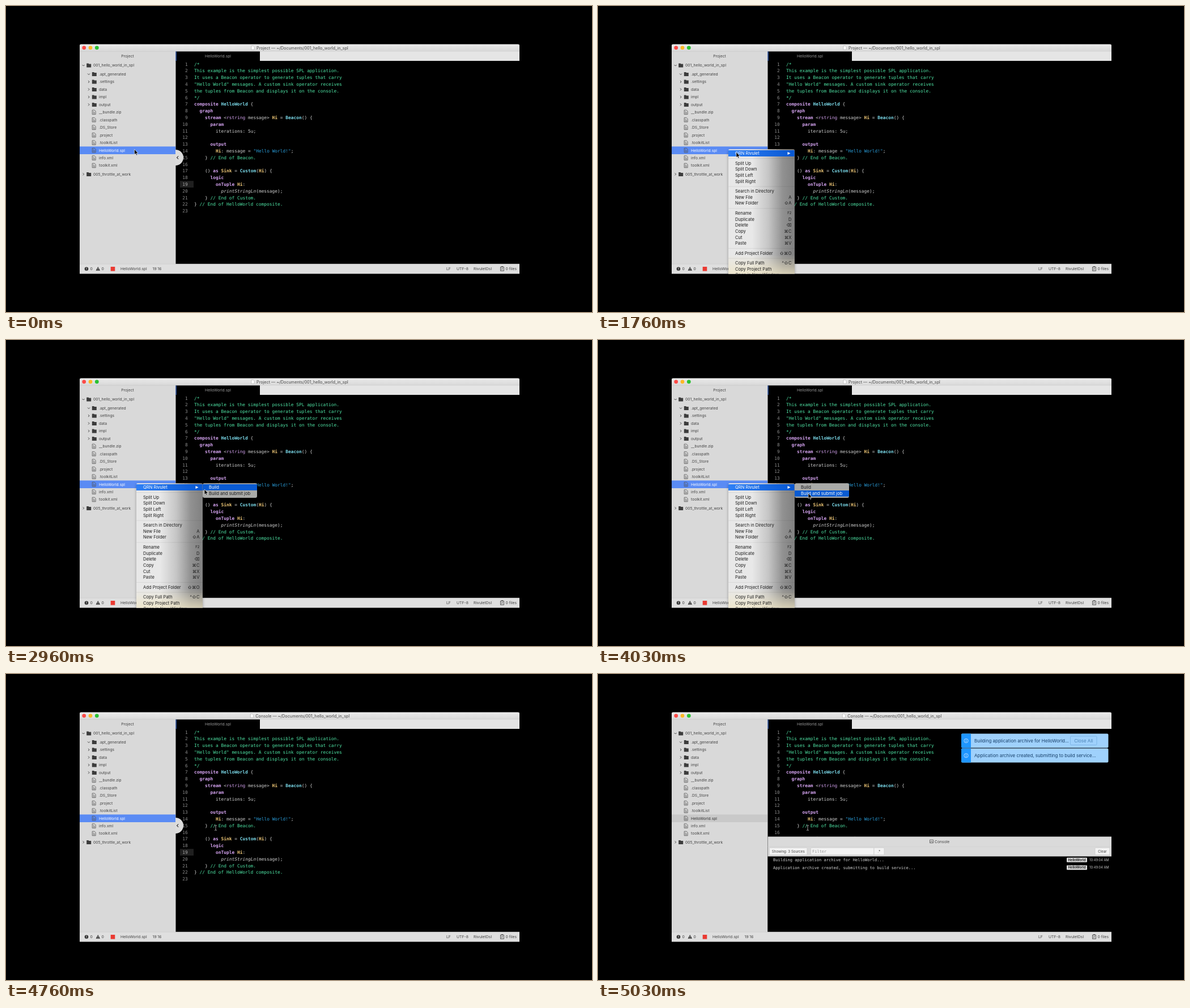
Recreate the animation shown at these times as an HTML page. Size 1034 px wide and 541 px high, loop 8000 ms.

```html
<!DOCTYPE html>
<html lang="en">
<head>
<meta charset="utf-8">
<title>Editor build demo</title>
<style>
html, body { margin: 0; width: 100%; height: 100%; overflow: hidden; background: #000; }
svg { display: block; }
text { font-family: Inter, "DejaVu Sans", sans-serif; white-space: pre; }
.mono { font-family: "DejaVu Sans Mono", monospace; }
</style>
</head>
<body>
<svg id="stage" width="1034" height="541" viewBox="0 0 1034 541"></svg>
<script>
const LOOP = 8000;
const esc = s => s.replace(/&/g, '&amp;').replace(/</g, '&lt;');
const rect = (x, y, w, h, fill, extra = '') =>
  `<rect x="${x}" y="${y}" width="${w}" height="${h}" fill="${fill}" ${extra}/>`;
const path = (d, stroke, width = 1, fill = 'none', extra = '') =>
  `<path d="${d}" fill="${fill}" stroke="${stroke}" stroke-width="${width}" ${extra}/>`;
const circle = (x, y, r, fill, extra = '') =>
  `<circle cx="${x}" cy="${y}" r="${r}" fill="${fill}" ${extra}/>`;
// y is the vertical centre of the capitals
const text = (x, y, s, size, fill = '#444', extra = '') =>
  `<text x="${x}" y="${y + size * 0.36}" font-size="${size}" fill="${fill}" ${extra}>${esc(s)}</text>`;
const group = (id, body, extra = '') => `<g id="${id}" ${extra}>${body}</g>`;
const END = 'text-anchor="end"', MID = 'text-anchor="middle"';

const defs = `<defs>
  <linearGradient id="titleBar" x2="0" y2="1"><stop stop-color="#ebebeb"/><stop offset="1" stop-color="#d8d8d8"/></linearGradient>
  <linearGradient id="menuFill"><stop offset=".36" stop-color="#e8e8e8"/><stop offset=".6" stop-color="#c6c6c6"/>
    <stop offset=".82" stop-color="#919191"/><stop offset="1" stop-color="#808080"/></linearGradient>
  <linearGradient id="menuWarm" x2="0" y2="1"><stop stop-color="#f0e6c4" stop-opacity="0"/><stop offset="1" stop-color="#f0e6c4" stop-opacity=".75"/></linearGradient>
  <linearGradient id="menuBlue"><stop stop-color="#2f80f6"/><stop offset="1" stop-color="#0757d2"/></linearGradient>
  <clipPath id="windowClip"><path d="M130 473.5V70.5a3 3 0 0 1 3-3H903a3 3 0 0 1 3 3V473.5Z"/></clipPath>
  <filter id="shadow" x="-10%" y="-10%" width="120%" height="120%"><feDropShadow dx="0" dy="2" stdDeviation="2.5" flood-opacity=".3"/></filter>
</defs>`;

function chrome() {
  const lights = ['#fc4a47', '#fdb825', '#2ac232'].map((c, i) => circle(137.7 + i * 11.3, 73.8, 3.4, c)).join('');
  const title = (id, x, word) => group(id,
    path(`M${x - 9} 70.6h3.4l1.6 1.6v5h-5Z`, '#aaa', 0.6, '#fff') +
    text(x, 74, word + ' — ~/Documents/001_hello_world_in_spl', 7.25, '#484848'));
  return rect(130, 67.5, 776, 406, '#d9d9d9') + rect(130, 67.5, 776, 12.7, 'url(#titleBar)') +
    rect(130, 79.8, 776, 0.6, '#c2c2c2') + lights +
    title('titleProject', 442, 'Project') + title('titleConsole', 440.3, 'Console') +
    rect(448, 80.4, 458, 16.6, '#e5e5e5') + rect(299.5, 80.4, 148.5, 17, '#000') +
    rect(299.5, 80.4, 1.2, 16.6, '#3d6fd2') + text(374, 88.6, 'HelloWorld.spl', 6.75, '#999', MID) +
    text(214.5, 88.6, 'Project', 6.8, '#444', MID);
}

const chevron = (x, y, open) =>
  path(open ? `M${x - 2} ${y - 1}l2 2l2 -2` : `M${x - 1} ${y - 2}l2 2l-2 2`, '#444', 1);
const folder = (x, y) => path(`M${x - 4} ${y - 3.4}h3.4l.8 1h3.8v6h-8Z`, 'none', 0, '#3c3c3c');
const file = (x, y) =>
  path(`M${x - 3} ${y - 3.8}h4l2 2v5.6h-6Z`, '#555', 0.8) +
  path(`M${x - 1.7} ${y - 1.2}h1.8M${x - 1.7} ${y + .6}h3.4M${x - 1.7} ${y + 2.2}h3.4`, '#555', 0.7);

function tree() {
  const names = ['.apt_generated', '.settings', 'data', 'impl', 'output', '__bundle.zip', '.classpath',
    '.DS_Store', '.project', '.toolkitList', 'HelloWorld.spl', 'info.xml', 'toolkit.xml'];
  let out = rect(130, 248.4, 169.2, 13.6, '#5a8bf4', 'id="selection"');
  for (const [y, name, open] of [[105, '001_hello_world_in_spl', true], [297.3, '005_throttle_at_work', false]])
    out += chevron(136.6, y, open) + folder(146.2, y) + text(154, y, name, 6.75);
  names.forEach((name, i) => {
    const y = 120.5 + i * 13.46;
    out += i < 5 ? chevron(146, y, !i) + folder(155.8, y) : file(155.2, y);
    out += text(164, y, name, 6.75, '#444', i === 10 ? 'id="selectedName"' : '');
  });
  return out;
}

const code = `/*
This example is the simplest possible SPL application.
It uses a Beacon operator to generate tuples that carry
"Hello World" messages. A custom sink operator receives
the tuples from Beacon and displays it on the console.
*/
composite HelloWorld {
  graph
    stream <rstring message> Hi = Beacon() {
      param
        iterations: 5u;

      output
        Hi: message = "Hello World!";
    } // End of Beacon.

    () as Sink = Custom(Hi) {
      logic
        onTuple Hi:
          printStringLn(message);
    } // End of Custom.
} // End of HelloWorld composite.
`.split('\n');

const styles = [
  [/^\/\//, 'fill="#4fe6a6"'],
  [/^"/, 'fill="#2b9fdc"'],
  [/^(composite|graph|stream|param|output|as|logic|onTuple)$/, 'fill="#d6a4f2" font-weight="bold"'],
  [/^rstring$/, 'fill="#d6a4f2"'],
  [/^(HelloWorld|Beacon|Custom)$/, 'fill="#7cdcec" font-weight="bold"'],
  [/^(Hi|Sink)$/, 'fill="#f0c877" font-weight="bold"'],
  [/^printStringLn$/, 'font-style="italic"'],
];
function highlight(line, i) {
  if (i < 6) return `<tspan fill="#4fe6a6">${esc(line)}</tspan>`;
  return (line.match(/\/\/.*|".*?"|\w+|\W/g) || []).map(token => {
    const style = styles.find(([rule]) => rule.test(token));
    return `<tspan ${style ? style[1] : ''}>${esc(token)}</tspan>`;
  }).join('');
}

function editor() {
  let out = rect(299.5, 97, 606.5, 359, '#000') + rect(307, 309.2, 24, 11.8, '#202020');
  code.forEach((line, i) => {
    const y = 105.5 + i * 11.8;
    out += `<text class="mono" font-size="7.88" y="${y}" x="320.7" fill="${i === 18 ? '#aaa' : '#8c8c8c'}" ${END}>${i + 1}</text>` +
      `<text class="mono" font-size="7.88" y="${y}" x="332" fill="#cfcfcf">${highlight(line, i)}</text>`;
  });
  return out + group('handle', path('M299 254a14 14 0 0 1 0 28Z', 'none', 0, '#dcdcdc') +
    path('M304.2 265.3l-2.7 2.7l2.7 2.7', '#333', 1.1));
}

function consolePanel() {
  const button = (x, w, label) => rect(x, 307.2, w, 12.6, '#f3f3f3', 'stroke="#c4c4c4" stroke-width=".6" rx="1"') +
    text(x + w / 2, 313.5, label, 6.15, '#444', MID);
  const row = (y, s) => text(309, y, s, 7.08, '#d2d2d2', 'class="mono"') +
    rect(827, y - 4, 36, 8, '#dcdcdc', 'rx="1"') + text(845, y, 'HelloWorld', 5.8, '#222', MID + ' font-weight="bold"') +
    text(901.5, y, '10:49:04 AM', 5.7, '#c4c4c4', END);
  return rect(299.5, 287.5, 606.5, 168.5, '#000') + rect(299.5, 287.5, 606.5, 35, '#dadada') +
    rect(299.5, 304.8, 606.5, 0.5, '#cbcbcb') +
    path('M585.5 293.2h6v5.6h-6ZM585.5 297h2l1-1.5l1 1.5h2', '#555', 0.8) + text(594, 296.3, 'Console', 6.8) +
    button(302.5, 66.5, 'Showing: 3 Sources') + button(375.5, 111.5, '') + button(487, 18, '.*') + button(877, 26, 'Clear') +
    text(378, 313.5, 'Filter', 7, '#999', 'class="mono"') +
    row(328.8, 'Building application archive for HelloWorld...') +
    row(342.2, 'Application archive created, submitting to build service...');
}

const notice = (id, y, s) => group(id,
  rect(641, y, 259.5, 25, '#9fd1fc', 'rx="2"') + path(`M658 ${y}h-15a2 2 0 0 0 -2 2v21a2 2 0 0 0 2 2h15Z`, 'none', 0, '#1f96ff') +
  circle(649.5, y + 12.6, 3.6, 'none', 'stroke="#c4e3ff" stroke-width=".9"') +
  path(`M649.5 ${y + 10.3}v1.1M649.5 ${y + 12.2}v2.6`, '#c4e3ff', 1) +
  text(664, y + 12.7, s, 8, '#173f68'));

function notices() {
  return notice('notice1', 105.4, 'Building application archive for HelloWorld...') +
    notice('notice2', 131.6, 'Application archive created, submitting to build service...') +
    group('closeAll', rect(833.5, 110, 46.5, 15.5, '#9fd1fc', 'stroke="#78b2e2" stroke-width=".8" rx="1.5"') +
      text(856.7, 117.8, 'Close All', 8, '#4b83b5', MID));
}

function statusBar() {
  const y = 464.7;
  return rect(130, 456, 776, 17.5, '#dfdfdf') + rect(130, 455.8, 776, 0.6, '#c6c6c6') +
    circle(142, y, 3.3, '#333') + path(`M142 ${y - 2}v2.4M142 ${y + 1}v1`, '#eee', 0.9) +
    path('M162.3 461l3.7 6.8h-7.4Z', 'none', 0, '#333') + path('M162.3 463.2v2.3M162.3 466v1', '#eee', 0.8) +
    rect(184.7, 461, 7.6, 7.6, '#ea3a32') +
    [[148.5, '0'], [168.5, '0'], [202, 'HelloWorld.spl'], [258.5, '19:16'], [777, 'LF'], [795, 'UTF-8'],
      [825, 'RivuletDsl'], [881.5, '0 files']].map(([x, s]) => text(x, y, s, 6.85)).join('') +
    path('M872.5 461.4h6v6.8h-6ZM874 460.7h3M874 464h3M874 466h2', '#444', 0.9);
}

function menu() {
  const items = [
    [260.4, 'QRN Rivulet', ''],
    [278, 'Split Up', ''], [288.6, 'Split Down', ''], [299.3, 'Split Left', ''], [310, 'Split Right', ''],
    [327.4, 'Search in Directory', ''], [338, 'New File', 'A'], [348.7, 'New Folder', '⇧A'],
    [366.2, 'Rename', 'F2'], [376.9, 'Duplicate', 'D'], [387.5, 'Delete', '⌫'], [398.2, 'Copy', '⌘C'],
    [408.8, 'Cut', '⌘X'], [419.5, 'Paste', '⌘V'], [436.9, 'Add Project Folder', '⇧⌘O'],
    [454.4, 'Copy Full Path', '^⇧C'], [465, 'Copy Project Path', ''], [475.7, 'Open in New Window', '']];
  const body = items.map(([y, label, key], i) =>
    text(242, y, label, 7.6, '#1c1c1c', i ? '' : 'id="menuLabel"') +
    text(341.5, y, key, key === 'F2' ? 6 : 7.6, '#1c1c1c', END)).join('');
  const rules = [269.2, 318.7, 357.5, 428.2, 445.7].map(y => rect(230, y, 117, 0.8, '#000', 'opacity=".09"')).join('');
  return rect(230, 253.3, 117, 240, 'url(#menuFill)', 'rx="2.5" filter="url(#shadow)"') +
    rect(230, 440, 117, 34, 'url(#menuWarm)') + rules +
    rect(230, 255, 116.5, 11, 'url(#menuBlue)', 'id="menuBar"') + body +
    path('M334.5 258l5 2.5l-5 2.5Z', 'none', 0, '#1c1c1c', 'id="menuArrow"') +
    group('submenu', rect(347, 253.3, 96, 25.7, '#a9aaa8', 'rx="3"') +
      rect(347, 255, 96, 10.8, '#0a5bd2', 'id="subBar"') +
      text(358, 260.4, 'Build', 7.65, '#1c1c1c', 'id="build"') +
      text(358, 271.2, 'Build and submit job', 7.65, '#1c1c1c', 'id="submit"'));
}

const pointers = group('pointer',
  group('arrow', path('M0 0V9.4L2.1 7.5L3.6 10.8L5.1 10.1L3.7 6.9H6.6Z', '#eee', 0.7, '#000')) +
  group('beam', path('M-2 -4.5Q0 -4.5 0 -3.2V3.2Q0 4.5 -2 4.5M2 -4.5Q0 -4.5 0 -3.2M0 3.2Q0 4.5 2 4.5', '#c8c8c8', 0.8)));

document.getElementById('stage').innerHTML = defs + group('window',
  chrome() + tree() + editor() + group('console', consolePanel()) + notices() + statusBar() + group('menu', menu()),
  'clip-path="url(#windowClip)"') + pointers;

const $ = id => document.getElementById(id);
const show = (id, on) => $(id).setAttribute('visibility', on ? 'inherit' : 'hidden');
const set = (id, name, value) => $(id).setAttribute(name, value);
const progress = (t, from, to) => Math.min(1, Math.max(0, (t - from) / (to - from)));

// time, x, y
const route = [[60, 226.5, 253.3], [300, 229.5, 254], [1100, 229.5, 254], [1500, 236, 257], [1860, 247, 259],
  [2260, 258.5, 259.3], [2660, 275, 260], [2960, 350, 264], [3250, 364, 268.5], [3560, 371, 270.8]];
function pointerAt(t) {
  const next = route.findIndex(p => p[0] > t);
  if (next <= 0) return (next ? route[route.length - 1] : route[0]).slice(1);
  const a = route[next - 1], b = route[next], k = progress(t, a[0], b[0]);
  return [a[1] + (b[1] - a[1]) * k, a[2] + (b[2] - a[2]) * k];
}

function popIn(id, t, start, centreY) {
  const k = progress(t, start, start + 160), scale = 0.9 + 0.1 * k;
  set(id, 'opacity', k);
  set(id, 'transform', `translate(${770 * (1 - scale)} ${centreY * (1 - scale)}) scale(${scale})`);
}

function render(t) {
  const ink = on => on ? '#fff' : '#1c1c1c';
  const inMenu = t >= 1460, blink = t >= 3860 && t < 3940;
  const onBuild = t >= 2940 && t < 3160, onSubmit = t >= 3160 && !blink;
  show('menu', t >= 1060 && t < 4460);
  set('menu', 'opacity', 1 - progress(t, 4130, 4460));
  show('menuBar', inMenu);
  set('menuLabel', 'fill', ink(inMenu));
  set('menuArrow', 'fill', ink(inMenu));
  show('submenu', t >= 1940);
  show('subBar', onBuild || onSubmit);
  set('subBar', 'y', onSubmit ? 266 : 255);
  set('build', 'fill', ink(onBuild));
  set('submit', 'fill', ink(onSubmit));

  const done = t >= 4730, panel = t >= 4800;
  show('titleProject', !done);
  show('titleConsole', done);
  show('console', panel);
  show('handle', !panel);
  set('selection', 'fill', panel ? '#c9c9c9' : '#5a8bf4');
  set('selectedName', 'fill', panel ? '#333' : '#fff');
  popIn('notice1', t, 4830, 118);
  popIn('notice2', t, 4870, 144);
  set('closeAll', 'opacity', progress(t, 4870, 5030));

  const beam = t >= 4500, [x, y] = beam ? [370, 272] : pointerAt(t);
  show('arrow', !beam);
  show('beam', beam);
  set('pointer', 'transform', `translate(${x} ${y})`);
}

function tick() {
  render(performance.now() % LOOP);
  requestAnimationFrame(tick);
}
tick();
</script>
</body>
</html>
```
